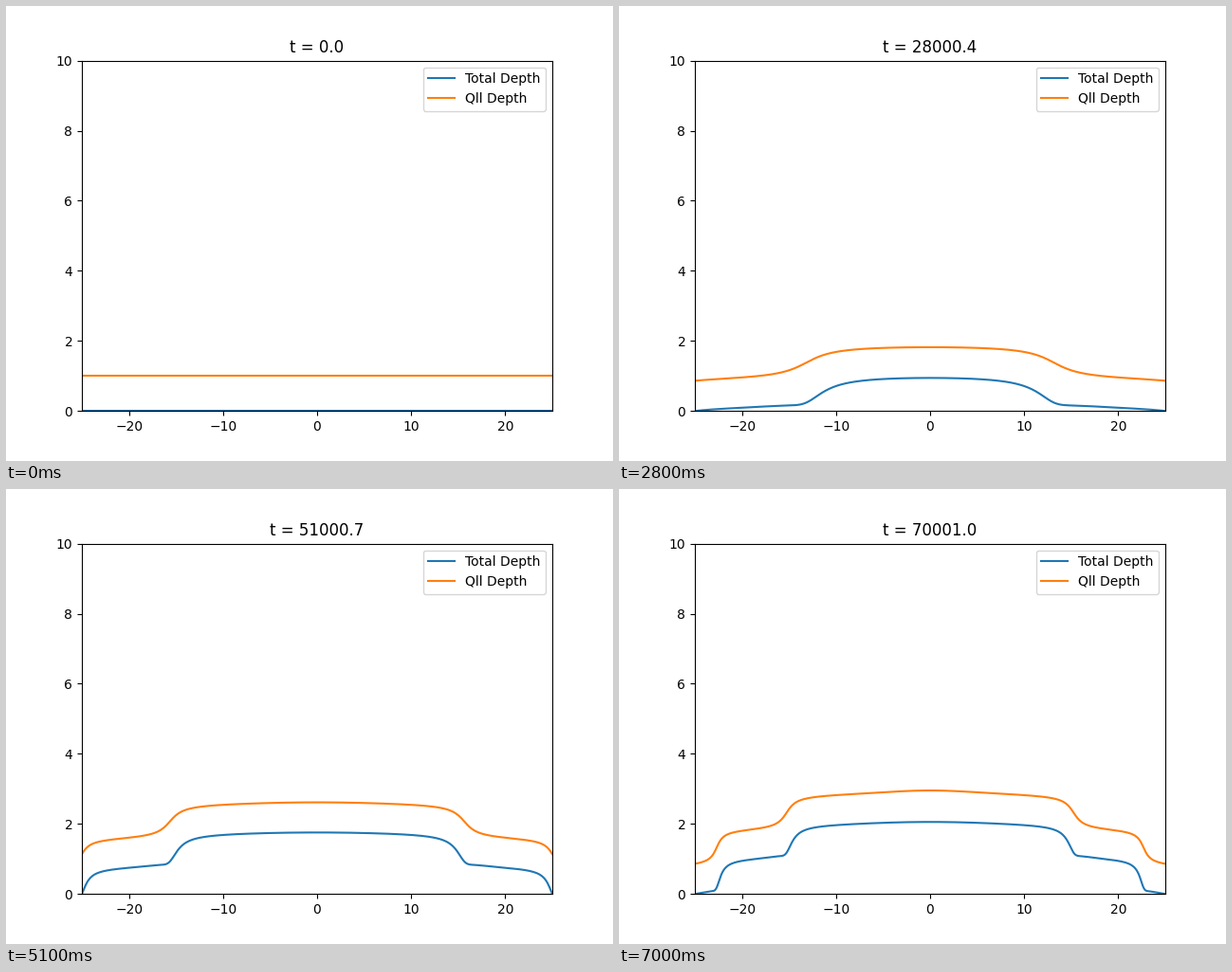
These frames come from a looping animation (640x480 px, 7.1 s). A matplotlib script:

```python
import numpy as np
import matplotlib.pyplot as plt
from matplotlib.animation import FuncAnimation

FRAMES = 71
HALF = 25
NBAR = 1.0
NSTAR = 0.9 / (2 * np.pi)

x = np.linspace(-HALF, HALF, 501)
times = np.linspace(0, 70001, FRAMES)

# ratio of slowest to fastest ablation, slightly larger near the corners
ratio = 0.26 + 0.015 * (x / HALF) ** 2
start = -np.arctan(1 / ratio) / np.pi


def layers_lost(t):
    """Layers removed at each x: a cycle that lingers on every full terrace."""
    s = t / 1000
    lead = 0.069 * (1 - np.exp(-s / 5))
    phase = start + lead + (0.2004 + 5.05e-5 * x ** 2) * s
    cycle = np.round(phase)
    within = np.arctan(ratio * np.tan(np.pi * (phase - cycle))) / np.pi
    return cycle + 0.25 + within


def depths(t):
    lost = layers_lost(t)
    qll = NBAR - NSTAR * np.sin(2 * np.pi * lost)
    ice = -lost - qll
    ice -= ice.min()
    return ice, ice + qll


fig, ax = plt.subplots(figsize=(6.4, 4.8), dpi=100)
ice_line, = ax.plot([], [], label="Total Depth")
qll_line, = ax.plot([], [], label="Qll Depth")
ax.set_xlim(-HALF, HALF)
ax.set_ylim(0, 10)
ax.legend(loc="upper right")
title = ax.set_title("t = 0.0")


def update(i):
    ice, total = depths(times[i])
    ice_line.set_data(x, ice)
    qll_line.set_data(x, total)
    title.set_text(f"t = {times[i]:.1f}")
    return ice_line, qll_line, title


anim = FuncAnimation(fig, update, frames=FRAMES, interval=100,
                     repeat=True, repeat_delay=0, blit=False)
plt.show()
```
